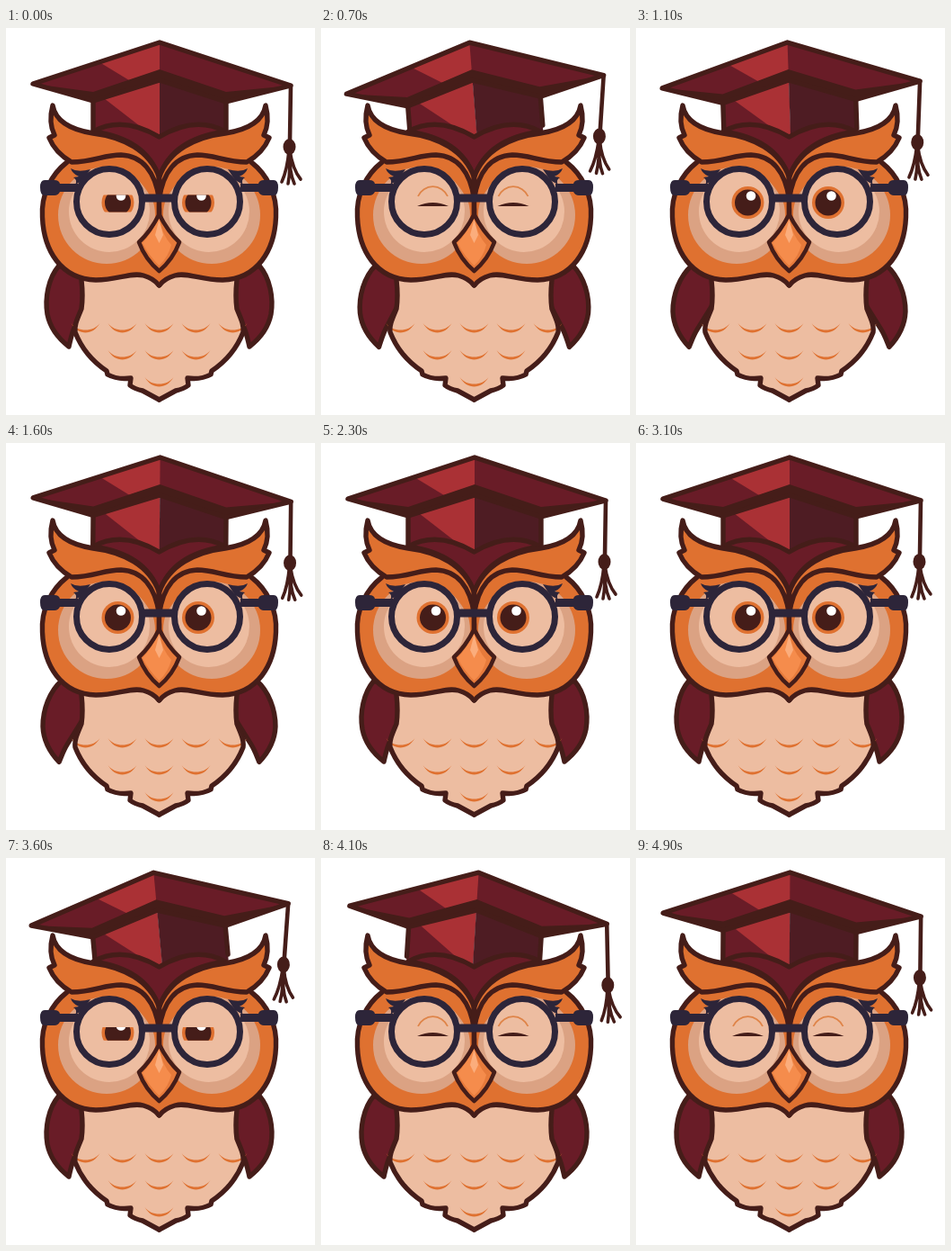
An HTML page for the animation above (5000 ms loop, 344 by 430 pixels).

```html
<!DOCTYPE html>
<html lang="en">
<head>
<meta charset="utf-8">
<title>Owl scholar</title>
<style>
  html, body { margin: 0; width: 100%; height: 100%; overflow: hidden; background: #fff; }
  svg { display: block; width: 100vw; height: 100vh; }
  .line { fill: none; stroke: #451d19; stroke-width: 5.4; stroke-linejoin: round; stroke-linecap: round; }
  .maroon { fill: #691c27; }
  .red { fill: #aa3135; }
  .dark { fill: #4e1c23; }
  .orange { fill: #df7130; }
  .tan { fill: #dba283; }
  .peach { fill: #edbda1; }
  .brown { fill: #451d19; }
  .navy { fill: #2d2539; }
  .frame { fill: none; stroke: #2d2539; stroke-width: 7; }
</style>
</head>
<body>
<svg viewBox="0 0 344 430">
  <defs>
    <clipPath id="lids"><rect id="gap" x="100" width="50"/></clipPath>
    <g id="wing">
      <path class="line maroon" style="fill:#691c27" d="M59 264C47 278 43 300 46 318C49 333 57 344 70 354C72 346 73 340 76 333L90 300L86 276Z"/>
    </g>
    <path id="bodyFill" class="peach" d="M171 270H84V312C78 324 76 330 77 338C84 356 97 371 112 381Q124 391 138 390L139 397Q143 401 171 413Z"/>
    <path id="bodyLine" class="line" d="M84 280Q86 298 84 312C79 324 76 330 77 338C84 356 97 371 112 381L113 385Q124 391 139 389L138 397Q143 401 152 403L170.500 413"/>
    <path id="scale" class="orange" d="M-16 -6C-8 8 8 8 16 -6C9 4 -9 4 -16 -6Z"/>
    <g id="headHalf">
      <path class="orange" d="M171 150H68C50 163 39 185 40 210C42 247 61 279 100 280C125 280 139 271 153 275Q164 278 171 286Z"/>
      <circle class="tan" cx="112" cy="208" r="54"/>
      <circle class="peach" cx="115" cy="204" r="45"/>
      <path class="line" d="M68 149C50 163 39 185 40.500 210C42 247 61 279 100 280C125 280 139 271 153 275Q164 278 170.500 286"/>
    </g>
    <g id="browHalf">
      <path class="orange" d="M72 149C98 148 105 140 128 140C152 142 166 160 170.500 208C158 175 142 158 115 153Q90 150 72 158Z"/>
      <path class="line" style="fill:#df7130" d="M52 86C55 104 72 113 97 117C130 121 160 136 170.500 166V190C166 160 152 142 128 141C108 141 98 149 73 149Q55 139 48 122L54 119Q47 105 52 86Z"/>
      <path class="line" d="M170.500 166V207"/>
    </g>
    <g id="side" class="navy">
      <path d="M43 169H54Q59 169 60 173L80 173V182H60Q58 186 54 186H43Q38 186 38 177Q38 169 43 169Z"/>
      <path d="M72 156Q80 161 94 157L86 169L77 174Q80 169 75 166L81 165Q74 162 72 156Z"/>
    </g>
    <g id="eye">
      <g clip-path="url(#lids)">
        <circle class="orange" cx="124.5" cy="194" r="18"/>
        <circle class="brown" cx="124.5" cy="194" r="14.500"/>
        <circle cx="128" cy="186.500" r="5.300" fill="#fff"/>
      </g>
      <g id="shut">
        <path d="M108 187A18 18 0 0 1 141 187" fill="none" stroke="#df8448" stroke-width="1.800"/>
        <path class="brown" d="M107 198Q124.5 190 142 198Z"/>
      </g>
    </g>
  </defs>

  <use href="#wing"/>
  <use href="#wing" class="flip"/>
  <use href="#bodyFill"/>
  <use href="#bodyFill" class="flip"/>
  <g id="scales"></g>
  <use href="#bodyLine"/>
  <use href="#bodyLine" class="flip"/>

  <g id="hat">
    <path class="maroon" d="M97 70L171 56V122H97Z"/>
    <path class="red" d="M109 78L171 58V126Z"/>
    <path class="dark" d="M171 56L245 72V122H171Z"/>
    <path class="line" d="M97 78V114M245 78V114"/>
    <path class="maroon" d="M30 62L171 16L317 64L245 83L171 58L97 82Z"/>
    <path class="red" d="M104 38L171 16V47L137 58Z"/>
    <path class="brown" d="M30 62L97 71L171 46L245 71L317 64L245 83L171 60L97 82Z"/>
    <path class="line" d="M30 62L171 16L317 64L245 82L171 58L97 81Z"/>
    <g id="tassel">
      <path class="line" style="stroke-width:4.6" d="M317 64L316 126"/>
      <path class="line" style="stroke-width:3.6" d="M315 136Q313 158 307 171M315 136Q317 158 314 173M316 136Q315 160 321 173M316 136Q319 157 328 168"/>
      <ellipse class="brown" cx="315.500" cy="132" rx="7" ry="9"/>
    </g>
  </g>

  <use href="#headHalf"/>
  <use href="#headHalf" class="flip"/>
  <path class="line" style="fill:#691c27" d="M97 115C117 104 142 104 170.500 121C199 104 224 104 244 115C205 121 181 136 170.500 166C160 136 136 121 97 115Z"/>
  <use href="#browHalf"/>
  <use href="#browHalf" class="flip"/>

  <use href="#eye"/>
  <use href="#eye" x="89.500"/>
  <use href="#side"/>
  <use href="#side" class="flip"/>
  <g class="frame">
    <circle cx="115" cy="193" r="36.500"/>
    <circle cx="224" cy="193" r="36.500"/>
    <path d="M151 189H188" stroke-width="9"/>
  </g>

  <path class="line" style="fill:#e67a3b;stroke-width:4.6" d="M170.500 207Q180 226 193 238Q186 257 170.500 270Q155 257 148 238Q161 226 170.500 207Z"/>
  <path d="M170.500 212Q162 228 152 239Q160 254 170.500 264Q181 254 184 241Q174 230 170.500 212Z" fill="#f58c4c"/>
  <path d="M170.500 213L166 230L170.500 239L175 230Z" fill="#fbad7c"/>
</svg>
<script>
  const $ = id => document.getElementById(id);
  const LOOP = 5000, STEP = 100, HOLD = 200, CENTRE = 170.5;

  const clamp = x => Math.min(1, Math.max(0, x));
  const ease = x => clamp(x) ** 2 * (3 - 2 * clamp(x));
  // Rises from 0 to 1 at the middle and falls back within the reach on each side
  const bump = (t, middle, reach) => Math.cos(clamp(Math.abs(t - middle) / reach) * Math.PI / 2) ** 2;

  // One wobble: a lean to the left, then two to the right
  const wobble = t => 3.7 * (bump(t, 1420, 200) + bump(t, 1900, 380)) - 5.6 * bump(t, 830, 450);
  const hatTurn = t => wobble(t) + wobble(t - 2700);

  const wingTurn = t => 9 * ease((t - 400) / 600) * ease((2250 - t) / 500);

  // Two groups of three evenly spaced blinks
  function eyeOpen(t) {
    const u = t < 2750 ? t + LOOP : t;
    const since = [0, 1, 2].flatMap(i => [700, 3450, 5700].map(first => Math.abs(u - first - 695 * i)));
    return clamp((Math.min(...since) - 115) / 95);
  }

  for (const el of document.querySelectorAll('.flip')) el.setAttribute('transform', 'matrix(-1 0 0 1 341 0)');

  [5, 3, 1].forEach((count, row) => {
    for (let i = 0; i < count; i++) {
      const x = CENTRE + 41 * (i - (count - 1) / 2), y = 334 + 30 * row;
      $('scales').insertAdjacentHTML('beforeend', `<use href="#scale" x="${x}" y="${y}"/>`);
    }
  });

  function draw(t) {
    const turn = hatTurn(t), open = eyeOpen(t);
    $('hat').setAttribute('transform', `rotate(${turn} 171 88)`);
    $('tassel').setAttribute('transform', `rotate(${-1.6 * turn} 317 64)`);
    $('wing').setAttribute('transform', `rotate(${wingTurn(t)} 62 285)`);
    $('gap').setAttribute('y', 196 - 22 * open);
    $('gap').setAttribute('height', 40 * open);
    $('shut').setAttribute('opacity', open < .15 ? 1 : 0);
  }

  const start = performance.now();
  function tick() {
    const t = (performance.now() - start) % LOOP;
    draw(t < HOLD ? 0 : Math.floor(t / STEP) * STEP);
    requestAnimationFrame(tick);
  }
  tick();
</script>
</body>
</html>
```
